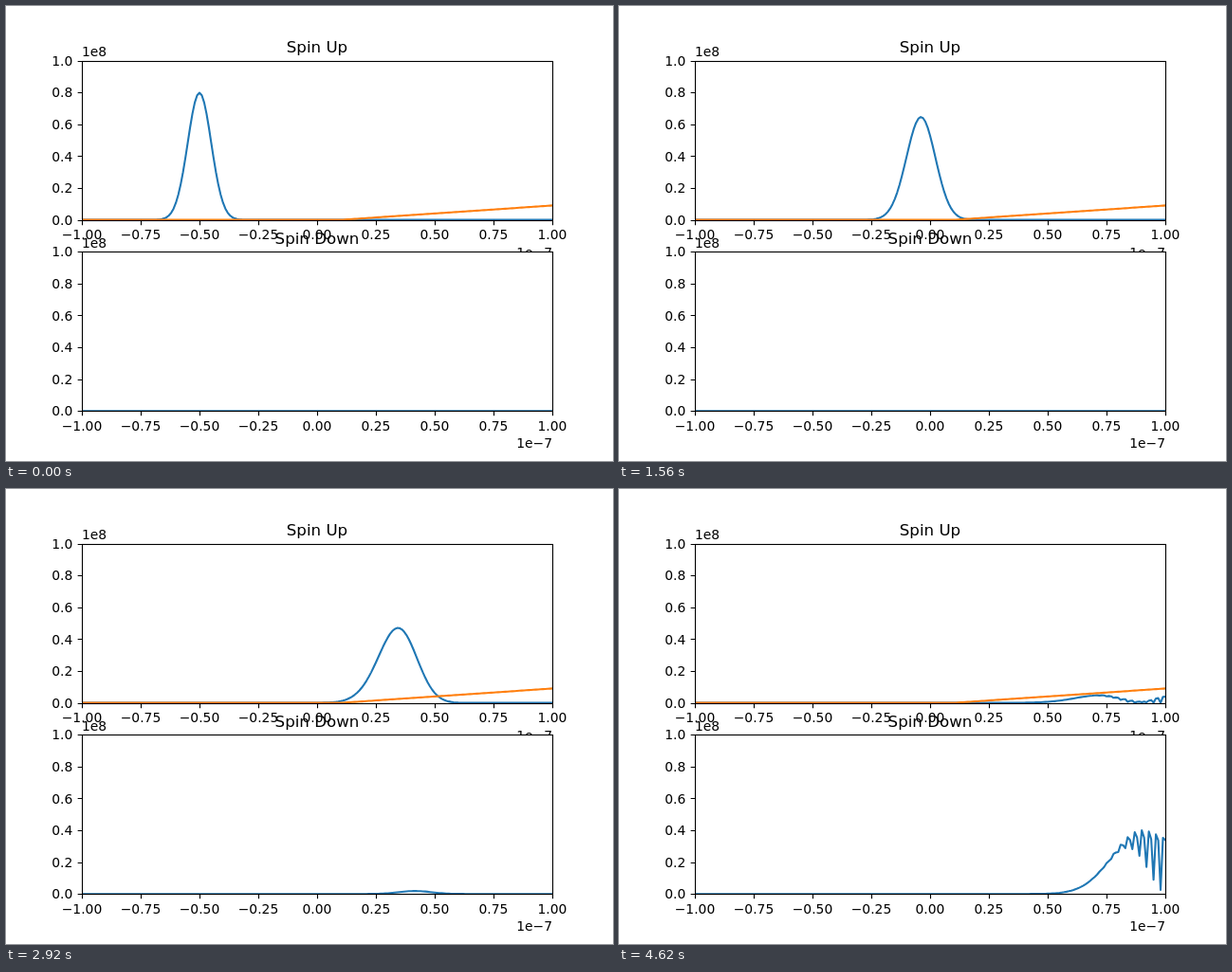
These frames come from a looping animation (640x480 px, 4640 ms). An HTML page:

```html
<!DOCTYPE html>
<html lang="en">
<head>
<meta charset="utf-8">
<title>Spin wave packet</title>
<style>
html, body { margin: 0; width: 100%; height: 100%; overflow: hidden; background: #fff; }
svg { display: block; width: 640px; height: 480px; }
text { font: 13.889px "DejaVu Sans", sans-serif; fill: #000; }
.title { font-size: 16.667px; }
.axis { fill: none; stroke: #000; stroke-width: 1.11; }
.curve { fill: none; stroke: #1f77b4; stroke-width: 2.083; stroke-linejoin: round; stroke-linecap: square; }
.field { stroke: #ff7f0e; }
</style>
</head>
<body>
<svg id="stage" viewBox="0 0 640 480"></svg>
<script>
const LOOP = 4640, FRAMES = 100;
const LEFT = 80, WIDTH = 496, HEIGHT = 168;
const POINTS = 201, CENTER = 50, SIGMA = 5;   // in grid cells
const WAVE = 0.9, HOP = 1.737, FIELD = 0.068, STEPS = 24;
const stage = document.getElementById('stage');
const grid = Array.from({ length: POINTS }, (_, i) => i / 100 - 1);
const ramp = x => Math.max(0, x - 0.1);

function add(parent, tag, attrs, content = '') {
  const el = document.createElementNS('http://www.w3.org/2000/svg', tag);
  for (const key in attrs) el.setAttribute(key, attrs[key]);
  el.textContent = content;
  parent.appendChild(el);
  return el;
}

function label(x, y, anchor, content, cls = '') {
  add(stage, 'text', { x, y, 'text-anchor': anchor, class: cls }, content);
}

const snap = v => Math.floor(v + 0.5) + 0.5;

function linePath(values, base) {
  return 'M' + values.map((v, i) =>
    (LEFT + WIDTH * i / (POINTS - 1)).toFixed(2) + ' ' + (base - v * HEIGHT).toFixed(2)).join('L');
}

// One subplot; returns a function that sets its blue curve.
function subplot(id, title, top, withField) {
  const base = top + HEIGHT, y0 = snap(top), y1 = snap(base);
  add(stage, 'rect', { x: LEFT, y: y0 - 0.5, width: WIDTH, height: y1 - y0, fill: '#fff' });
  const clip = add(stage, 'clipPath', { id });
  add(clip, 'rect', { x: LEFT, y: y0 - 0.5, width: WIDTH + 1, height: y1 - y0 + 1 });
  const plot = add(stage, 'g', { 'clip-path': `url(#${id})` });
  const curve = add(plot, 'path', { class: 'curve' });
  if (withField) {
    add(plot, 'path', { class: 'curve field', d: linePath(grid.map(x => 0.1 * ramp(x)), base) });
  }

  let ticks = '';
  for (let i = 0; i <= 8; i++) {
    const x = LEFT + 62 * i, v = i / 4 - 1;
    ticks += `M${x + 0.5} ${y1}v4.86`;
    label(x, Math.round(base + 20.3), 'middle', (v < 0 ? '\u2212' : '') + Math.abs(v).toFixed(2));
  }
  for (let i = 0; i <= 5; i++) {
    const y = base - HEIGHT * i / 5;
    ticks += `M${LEFT + 0.5} ${snap(y)}h-4.86`;
    label(70.3, Math.round(y + 5.2), 'end', (i / 5).toFixed(1));
  }
  add(stage, 'path', { class: 'axis', d: ticks });
  add(stage, 'rect', { class: 'axis', x: LEFT + 0.5, y: y0, width: WIDTH, height: y1 - y0 });
  label(LEFT, Math.round(top - 4.4), 'start', '1e8');
  label(LEFT + WIDTH, Math.round(base + 39), 'end', '1e\u22127');
  label(LEFT + WIDTH / 2, Math.round(top - 8.6), 'middle', title, 'title');
  return values => curve.setAttribute('d', linePath(values, base));
}

// Schrödinger evolution on the grid with walls, potential sign * FIELD * ramp.
function evolve(sign) {
  const re = new Float64Array(POINTS + 2), im = new Float64Array(POINTS + 2);
  const pot = grid.map(x => sign * FIELD * ramp(x));
  for (let i = 0; i < POINTS; i++) {
    const d = i - CENTER, a = Math.exp(-d * d / (4 * SIGMA * SIGMA));
    re[i + 1] = a * Math.cos(WAVE * d);
    im[i + 1] = a * Math.sin(WAVE * d);
  }
  const kick = (to, from, dt) => {
    for (let i = 1; i <= POINTS; i++) {
      to[i] += dt * (pot[i - 1] * from[i] - HOP / 2 * (from[i - 1] + from[i + 1]));
    }
  };
  const states = [], dt = 1 / STEPS;
  for (let n = 0; n < FRAMES; n++) {
    states.push({ re: re.slice(1, -1), im: im.slice(1, -1) });
    for (let s = 0; s < STEPS; s++) {
      kick(re, im, dt / 2);
      kick(im, re, -dt);
      kick(re, im, dt / 2);
    }
  }
  return states;
}

const plus = evolve(1), minus = evolve(-1);
const peak = 1 / (Math.sqrt(2 * Math.PI) * 0.5);

function density(n, sign) {
  const p = plus[n], m = minus[n];
  return grid.map((_, i) =>
    peak / 4 * ((p.re[i] + sign * m.re[i]) ** 2 + (p.im[i] + sign * m.im[i]) ** 2));
}

const setUp = subplot('upper', 'Spin Up', 57.6, true);
const setDown = subplot('lower', 'Spin Down', 259.2, false);

// Steps last 20, 20 and 100 ms in turn.
function stepAt(t) {
  const u = t + 20, r = u % 140;
  return 3 * Math.floor(u / 140) + (r < 20 ? 0 : r < 40 ? 1 : 2) - 1;
}

let shown = -1;
const start = performance.now();
function draw(now) {
  const n = stepAt(Math.max(0, now - start) % LOOP);
  if (n !== shown) {
    shown = n;
    setUp(density(n, 1));
    setDown(density(n, -1));
  }
  requestAnimationFrame(draw);
}
draw(start);
</script>
</body>
</html>
```
